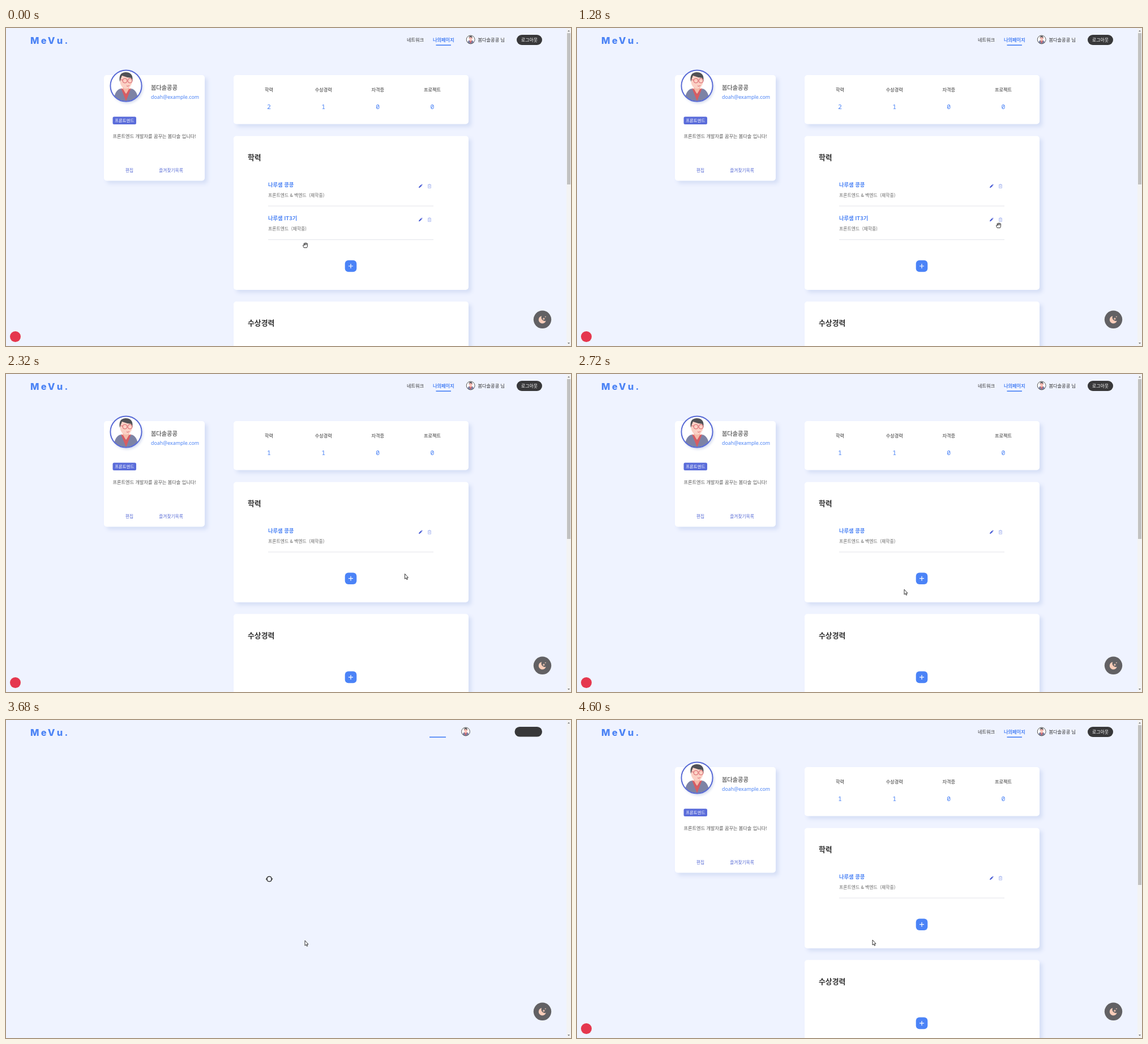
Animation of 998x561 px, one loop 4.64 s. Source, as an HTML page:

```html
<!DOCTYPE html>
<html lang="ko">
<head>
<meta charset="utf-8">
<style>
  html, body { margin: 0; width: 100%; height: 100%; overflow: hidden; background: #eff3ff; }
  svg { display: block; width: 998px; height: 561px; }
  text { font-family: "Noto Sans CJK KR", "Noto Sans CJK", "Noto Sans CJK JP", sans-serif; font-size: 8.2px; fill: #333; white-space: pre; }
  .mid { text-anchor: middle; }
  .bold { font-weight: 700; }
  .semi { font-weight: 500; }
  .blue { fill: #4b83f5; }
  .indigo { fill: #5468d4; font-size: 7.7px; }
  .title { font-size: 12.9px; font-weight: 700; }
  .item { font-size: 9.3px; font-weight: 700; fill: #4b83f5; }
  .sub { font-size: 7.9px; fill: #666; }
  .num { font: 500 11.5px "Noto Sans Mono", monospace; fill: #4b83f5; text-anchor: middle; }
  .logo { font: 800 16.4px Inter, sans-serif; letter-spacing: 3.3px; fill: #4b83f5; }
  .mail { font: 8.9px "Noto Sans", sans-serif; fill: #4b83f5; }
  .card { fill: #fff; filter: drop-shadow(5px 5px 3px #d6dff6); }
  .cursor path { fill: #fff; stroke: #222; stroke-width: .9; stroke-linejoin: round; }
</style>
</head>
<body>
<svg viewBox="0 0 998 561">
  <defs>
    <clipPath id="round"><circle r="27"/></clipPath>
    <g id="avatar">
      <circle r="27" fill="#fff"/>
      <g clip-path="url(#round)">
        <path d="M-22 30Q-21 8-10 5L0 9L10 5Q21 8 22 30Z" fill="#7d83a5"/>
        <path d="M-6 1H6V8L0 14L-6 8Z" fill="#f5b9a9"/>
        <path d="M-9 4L0 27L9 4L5 6L0 15L-5 6Z" fill="#d85c62"/>
        <ellipse cy="-8" rx="10.5" ry="13" fill="#fbd0c4"/>
        <path d="M-11-7Q-14-23-1-24Q14-24 11-7L9-14Q0-15-7-18Q-9-14-11-7Z" fill="#515156"/>
        <g fill="none" stroke="#d9626b" stroke-width="1">
          <circle cx="-2" cy="-9" r="4"/><circle cx="7" cy="-9" r="4"/>
          <path d="M-6-10L-10-11M1 0Q4 2 6-1"/>
        </g>
      </g>
    </g>
    <g id="tools">
      <path d="M-3 3L-2.5 1L1.2-2.7L2.8-1.1L-.9 2.6ZM1.7-3.2L2.3-3.7L3.8-2.2L3.2-1.6Z" fill="#4659d4"/>
      <path d="M13-2.2H19M14.7-2.2V-3.3H17.3V-2.2M13.6-2.2V3.3H18.4V-2.2M15.2-.6V1.8M16.8-.6V1.8" fill="none" stroke="#a3b2ef" stroke-width=".8"/>
    </g>
    <g id="add">
      <rect x="-10.3" y="-10.3" width="20.6" height="20.6" rx="6" fill="#4b83f7"/>
      <path d="M-4 0H4M0-4V4" stroke="#fff" stroke-width="1.2"/>
    </g>
  </defs>

  <rect width="998" height="561" fill="#eff3ff"/>
  <text class="logo" x="43" y="28">MeVu.</text>

  <g id="loading">
    <rect x="748" y="29.4" width="29" height="1.7" fill="#4b83f5"/>
    <use href="#avatar" transform="translate(812 20.5) scale(.27)"/>
    <circle cx="812" cy="20.5" r="7.4" fill="none" stroke="#555"/>
    <rect x="898.5" y="12" width="48.5" height="17.5" rx="8.7" fill="#38383a"/>
    <g id="spinner" transform="translate(465 280.5)">
      <path d="M-4.3-1.2A4.5 4.5 0 0 1 4.4-.6M4.3 1.2A4.5 4.5 0 0 1-4.4 .6" fill="none" stroke="#222" stroke-width="1.2"/>
      <path d="M2.2-.8H6.6L4.4 1.7ZM-2.2 .8H-6.6L-4.4-1.7Z" fill="#222"/>
    </g>
  </g>

  <g id="page">
    <text class="semi" x="708" y="24">네트워크</text>
    <text class="bold blue" x="754" y="24">나의페이지</text>
    <rect x="759.5" y="29.4" width="26.5" height="1.7" fill="#4b83f5"/>
    <use href="#avatar" transform="translate(820.7 20.5) scale(.27)"/>
    <circle cx="820.7" cy="20.5" r="7.4" fill="none" stroke="#555"/>
    <text x="833.5" y="24">봄다솔콩콩 님</text>
    <rect x="902" y="12" width="45" height="18" rx="9" fill="#38383a"/>
    <text class="mid semi" x="924.5" y="24" style="fill:#fff;font-size:7.9px">로그아웃</text>

    <rect class="card" x="173" y="83" width="178" height="186.5" rx="5"/>
    <g transform="translate(212 102)">
      <circle r="28" fill="#fff" style="filter:drop-shadow(2px 3px 2px #d3daee)"/>
      <use href="#avatar"/>
      <circle r="27.6" fill="none" stroke="#596bd6" stroke-width="2"/>
    </g>
    <text class="semi" x="256" y="108.5" style="font-size:10.2px">봄다솔콩콩</text>
    <text class="mail" x="256" y="125">doah@example.com</text>
    <rect x="188.5" y="156.5" width="41.5" height="13.5" rx="2.5" fill="#5a6cda"/>
    <text class="mid semi" x="209.2" y="166" style="fill:#fff;font-size:7.4px">프론트엔드</text>
    <text x="188.5" y="193.7" style="fill:#555">프론트엔드 개발자를 꿈꾸는 봄다솔 입니다!</text>
    <text class="mid indigo" x="218" y="254">편집</text>
    <text class="mid indigo" x="291.5" y="254">즐겨찾기목록</text>

    <rect class="card" x="402" y="83" width="415" height="86.5" rx="5"/>
    <g class="mid">
      <text class="semi" x="464.5" y="111.5">학력</text>
      <text class="semi" x="560.7" y="111.5">수상경력</text>
      <text class="semi" x="656.8" y="111.5">자격증</text>
      <text class="semi" x="753" y="111.5">프로젝트</text>
    </g>
    <text class="num" id="count" x="464.5" y="143">2</text>
    <text class="num" x="560.7" y="143">1</text>
    <text class="num" x="656.8" y="143">0</text>
    <text class="num" x="753" y="143">0</text>

    <rect class="card" id="school" x="402" y="190.5" width="415" height="271.5" rx="5"/>
    <text class="title" x="427" y="233">학력</text>
    <text class="item" x="463" y="279.5">나루샘 콩콩</text>
    <text class="sub" x="463" y="297.7">프론트엔드 &amp; 백엔드  (재학중)</text>
    <use href="#tools" x="732" y="279"/>
    <path d="M463 314H755" stroke="#e2e3e9"/>
    <g id="second">
      <text class="item" x="463" y="338.8">나루샘 IT3기</text>
      <text class="sub" x="463" y="357">프론트엔드  (재학중)</text>
      <use href="#tools" x="732" y="338.2"/>
      <path d="M463 373.3H755" stroke="#e2e3e9"/>
    </g>
    <g id="below">
      <use href="#add" x="609" y="420"/>
      <rect class="card" x="402" y="482.5" width="415" height="180" rx="5"/>
      <text class="title" x="427" y="525.3">수상경력</text>
      <use href="#add" x="609" y="594.2"/>
    </g>
  </g>

  <circle id="badge" cx="16.5" cy="544.5" r="9.5" fill="#e5374e"/>
  <g transform="translate(947.5 514.3)">
    <circle r="15.7" fill="#626164"/>
    <path d="M-1.2-6.2A6.6 6.6 0 1 0 6.2 2.2A6 6 0 0 1-1.2-6.2Z" fill="#f9cdb9"/>
    <path d="M2.4-4L3.1-2L5.1-1.3L3.1-.6L2.4 1.4L1.7-.6L-.3-1.3L1.7-2ZM5.4-6.6L5.8-5.4L7-5L5.8-4.6L5.4-3.4L5-4.6L3.8-5L5-5.4Z" fill="#f9cdb9"/>
  </g>

  <rect x="990" width="8" height="561" fill="#f3f3f4"/>
  <path id="arrows" d="M992 6.2L994 3.8L996 6.2ZM992 555L994 557.4L996 555Z" fill="#777"/>
  <rect id="thumb" x="991" y="9" width="6" height="267" fill="#c1c1c1"/>

  <g id="cursor" class="cursor">
    <path id="arrow" d="M0 0V9L2 7.2L3.4 10.2L4.8 9.6L3.4 6.7H6Z"/>
    <path id="hand" d="M-1 1Q0-.6 1 1V4.5L4.5 5.3Q6 5.8 5.8 7.5L5 12H0L-3 8Q-3.6 6.6-2 6.8L-1 7.6ZM1 4.5V6.5M2.8 5V6.8"/>
    <path id="grab" d="M-2.8 4.6L-4.4 1.2Q-4.8-.2-3.4 0L-2.6 .8L-3-2.6Q-2.4-4-1.6-2.8Q-1-4.8 0-3.4Q1.2-4.8 1.8-3Q3.4-3.8 3.6-2L3.4 2L2.4 4.6ZM-1.5-2.6V0M0-3V0M1.7-2.7V0"/>
  </g>
</svg>
<script>
  const LOOP = 4640, STEP = 40;
  const REMOVED = 2200, RELOAD = 3520, BADGE = 3760, LOADED = 3800;
  const ROW = 59.3;
  // time, x, y of the pointer's hot spot
  const PATH = [
    [0, 529, 383], [160, 530, 386], [320, 530, 386], [360, 530, 388], [520, 530, 388],
    [640, 531, 405], [800, 560, 402], [1080, 700, 360], [1280, 745, 348], [1600, 748, 343],
    [1960, 749, 341], [2160, 749, 341], [2480, 660, 364], [2720, 578, 380], [3160, 528, 389],
    [3800, 528, 389], [4160, 524, 391], [4320, 524, 391], [4360, 523, 390], [4520, 523, 390],
    [4600, 522, 388], [LOOP, 522, 388]
  ];
  const $ = id => document.getElementById(id);
  const show = (id, on) => $(id).style.display = on ? "" : "none";

  function pointerAt(t) {
    const i = PATH.findIndex(k => k[0] > t);
    const [t0, x0, y0] = PATH[i - 1], [t1, x1, y1] = PATH[i];
    const p = (t - t0) / (t1 - t0);
    return [x0 + (x1 - x0) * p, y0 + (y1 - y0) * p];
  }

  function draw(now) {
    const t = Math.floor(now % LOOP / STEP) * STEP;
    const removed = t >= REMOVED, loading = t >= RELOAD && t < LOADED;
    show("page", !loading);
    show("loading", loading);
    show("thumb", !loading);
    show("badge", t < RELOAD || t >= BADGE);
    show("second", !removed);
    $("count").textContent = removed ? 1 : 2;
    $("school").setAttribute("height", removed ? 271.5 - ROW : 271.5);
    $("below").setAttribute("transform", `translate(0 ${removed ? -ROW : 0})`);
    $("thumb").setAttribute("height", removed ? 282 : 267);

    const [x, y] = pointerAt(t);
    const onTrash = !removed && Math.abs(x - 748) < 5 && Math.abs(y - 339) < 6;
    const onRow = !loading && x > 463 && x < 755 && y > 255 && y < (removed ? 333 : 392);
    show("hand", onTrash);
    show("grab", onRow && !onTrash);
    show("arrow", !onRow);
    $("cursor").setAttribute("transform", `translate(${x} ${y})`);
  }

  const start = performance.now();
  (function tick() {
    draw(performance.now() - start);
    requestAnimationFrame(tick);
  })();
</script>
</body>
</html>
```
